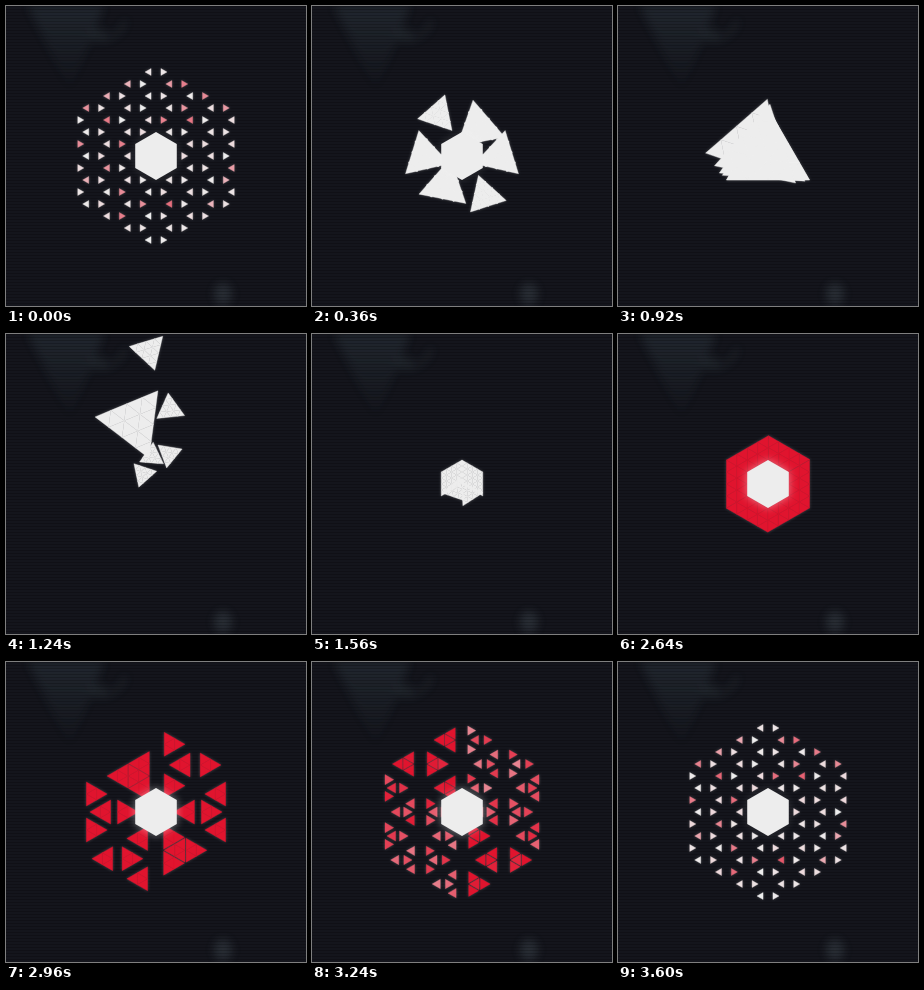
An HTML page for the animation above (3680 ms loop, 300 by 300 pixels).

```html
<!DOCTYPE html>
<html lang="en">
<head>
<meta charset="utf-8">
<title>Triangles</title>
<style>
html, body { margin: 0; width: 100%; height: 100%; overflow: hidden; background: #13141b; }
svg { display: block; width: 100vw; height: 100vh; }
#leaves { filter: drop-shadow(0 0 1.5px rgba(255, 255, 255, .22)); }
#leaves path { stroke-width: .35; stroke-linejoin: miter; }
</style>
</head>
<body>
<svg viewBox="0 0 300 300">
  <defs>
    <pattern id="lines" width="300" height="3" patternUnits="userSpaceOnUse">
      <rect width="300" height="1" fill="#000" opacity=".2"/>
    </pattern>
    <linearGradient id="haze" x2="0" y2="1">
      <stop stop-color="#56707a" stop-opacity=".2"/>
      <stop offset="1" stop-color="#56707a" stop-opacity="0"/>
    </linearGradient>
    <filter id="soft" x="-60%" y="-60%" width="220%" height="220%"><feGaussianBlur stdDeviation="4"/></filter>
  </defs>
  <rect width="300" height="300" fill="#14151c"/>
  <g filter="url(#soft)">
    <path d="M22 0H98L64 84Z" fill="url(#haze)"/>
    <ellipse cx="92" cy="29" rx="9" ry="6" fill="#6b858a" opacity=".14"/>
    <path d="M96 34Q116 30 119 14" fill="none" stroke="#6b858a" stroke-width="4" opacity=".13"/>
    <ellipse cx="217" cy="288" rx="9" ry="11" fill="#7d9398" opacity=".2"/>
  </g>
  <rect width="300" height="300" fill="url(#lines)"/>
  <g id="leaves"></g>
  <g id="core">
    <path id="glow" filter="url(#soft)" fill="#fff"/>
    <path id="hex" fill="#ededed"/>
  </g>
</svg>
<script>
const LOOP = 3680, STEP = 40, MID = 150, ROOT3 = Math.sqrt(3);
const RED = [224, 20, 46], WHITE = [237, 237, 237];
const LAG = [0, 40, 130, 10, 40, 150];
const $ = id => document.getElementById(id);
const clamp = v => Math.max(0, Math.min(1, v));
const mix = (a, b, p) => a + (b - a) * p;
const inOut = p => p < .5 ? 2 * p * p : 1 - 2 * (1 - p) ** 2;
const outQuart = p => 1 - (1 - p) ** 4;
const polar = (r, deg) => [r * Math.cos(deg * Math.PI / 180), r * Math.sin(deg * Math.PI / 180)];

// Linear interpolation through rows of [time, ...values]
function track(rows, t) {
  let i = 1;
  while (i < rows.length - 1 && rows[i][0] < t) i++;
  const a = rows[i - 1], b = rows[i], p = clamp((t - a[0]) / (b[0] - a[0]));
  return a.slice(1).map((v, j) => mix(v, b[j + 1], p));
}

// progress: spread, leaf side
const GATHER = [[0, 1, 7], [.22, .5, 8], [.38, .37, 9.5], [.64, .48, 14], [1, .866, 20.75]];
// age: x, y, pull to the landing spot, share of the turn, side
const FLIGHT = [
  [0, 0, 0, 0, 0, 83], [150, -8, -5, 0, .08, 83], [200, -16, -12, 0, .21, 82],
  [235, -26, -32, 0, .23, 77], [270, -22, -62, 0, .25, 68], [320, -14, -145, 1, .48, 35],
  [370, 0, -75, 1, .76, 28], [420, 6, -18, 1, .77, 24.5], [470, 3, -16, 1, .83, 24],
  [520, 1, -10, 1, .87, 24], [680, 0, 0, 1, 1, 24]
];

let seed = 11;
const rand = () => (seed = seed * 16807 % 2147483647) / 2147483647;

const leaves = [];
for (let k = 0; k < 6; k++)
  for (let i = 0; i < 4; i++)
    for (let j = 0; j < 4; j++) {
      const el = document.createElementNS('http://www.w3.org/2000/svg', 'path');
      $('leaves').append(el);
      leaves.push({ el, k, i, j, tint: rand() < .24 ? .3 + rand() * .4 : rand() * .1, wait: rand() * .35 });
    }

const hexPath = 'M' + [0, 1, 2, 3, 4, 5].map(n => polar(24, n * 60 - 90).map(v => MID + v).join(' ')).join('L') + 'Z';
$('hex').setAttribute('d', hexPath);
$('glow').setAttribute('d', hexPath);

// A solid triangle of the given side, cut into sixteen
const solid = (x, y, rot, side) =>
  ({ x, y, rot, a: side / ROOT3 / 2, b: side / ROOT3 / 4, side: side / 4 });

function sector(k, t) {
  const angle = k * 60 - 60, home = k % 2 ? 30 : -30;
  if (t < 720) {
    const v = clamp((t - LAG[k]) / 560), [spread, side] = track(GATHER, v);
    const [x, y] = polar(96 / ROOT3 * (1 - v * v), angle);
    return { x, y, rot: home * (1 - v), a: 48 / ROOT3 * spread, b: 24 / ROOT3 * spread, side };
  }
  if (t < 1700) {
    const age = t - 720 - (k + 2) % 6 * 50;
    const [x, y, pull, turn, side] = track(FLIGHT, age);
    const [endX, endY] = polar(24 / ROOT3, angle);
    return solid(x + endX * pull, y + endY * pull, turn * (k % 2 ? 150 : 90), side);
  }
  if (t < 2600) {
    const size = mix(24, 48, outQuart(clamp((t - 1700 - k * 20) / 600)));
    return solid(...polar(size / ROOT3, angle), home, size);
  }
  const s = t - 2600 - LAG[k];
  const out = inOut(clamp(s / 420)), part = inOut(clamp((s - 170) / 300)), split = inOut(clamp((s - 400) / 450));
  const [x, y] = polar(48 / ROOT3 * (1 + out), angle);
  return {
    x, y, rot: home, a: 24 / ROOT3 * (1 + part), b: 12 / ROOT3 * (1 + split),
    side: mix(12, 7, split), split
  };
}

function whiteness(leaf, t, split) {
  if (t < 720) return 1 - leaf.tint * .85 * (1 - clamp(t / 240));
  if (t < 1700) return 1;
  if (t < 2600) return 0;
  return clamp((split - leaf.wait) / (1 - leaf.wait)) * (1 - leaf.tint);
}

function drawLeaf(leaf, s, t) {
  const { i, j, el } = leaf;
  const corner = (n, flip) => s.rot - 90 + (n - 1) * 120 + flip * 180;
  const inner = +(i === 0), flip = inner ^ +(j === 0);
  const [ax, ay] = i ? polar(s.a, corner(i, 0)) : [0, 0];
  const [bx, by] = j ? polar(s.b, corner(j, inner)) : [0, 0];
  const x = MID + s.x + ax + bx, y = MID + s.y + ay + by;
  const points = [1, 2, 3].map(n => {
    const [dx, dy] = polar(s.side / ROOT3, corner(n, flip));
    return (x + dx).toFixed(2) + ' ' + (y + dy).toFixed(2);
  });
  const w = whiteness(leaf, t, s.split || 0);
  const color = `rgb(${RED.map((c, n) => Math.round(mix(c, WHITE[n], w)))})`;
  el.setAttribute('d', 'M' + points.join('L') + 'Z');
  el.setAttribute('fill', color);
  el.setAttribute('stroke', color);
}

function draw(t) {
  const sectors = LAG.map((_, k) => sector(k, t));
  leaves.forEach(leaf => drawLeaf(leaf, sectors[leaf.k], t));
  $('core').style.display = t >= 720 && t < 1700 ? 'none' : '';
  $('glow').setAttribute('opacity', t >= 1700 && t < 3300 ? .45 : .14);
}

const start = performance.now();
function tick() {
  const t = (performance.now() - start) % LOOP;
  draw(Math.min(3600, Math.floor(t / STEP) * STEP));
  requestAnimationFrame(tick);
}
tick();
</script>
</body>
</html>
```
